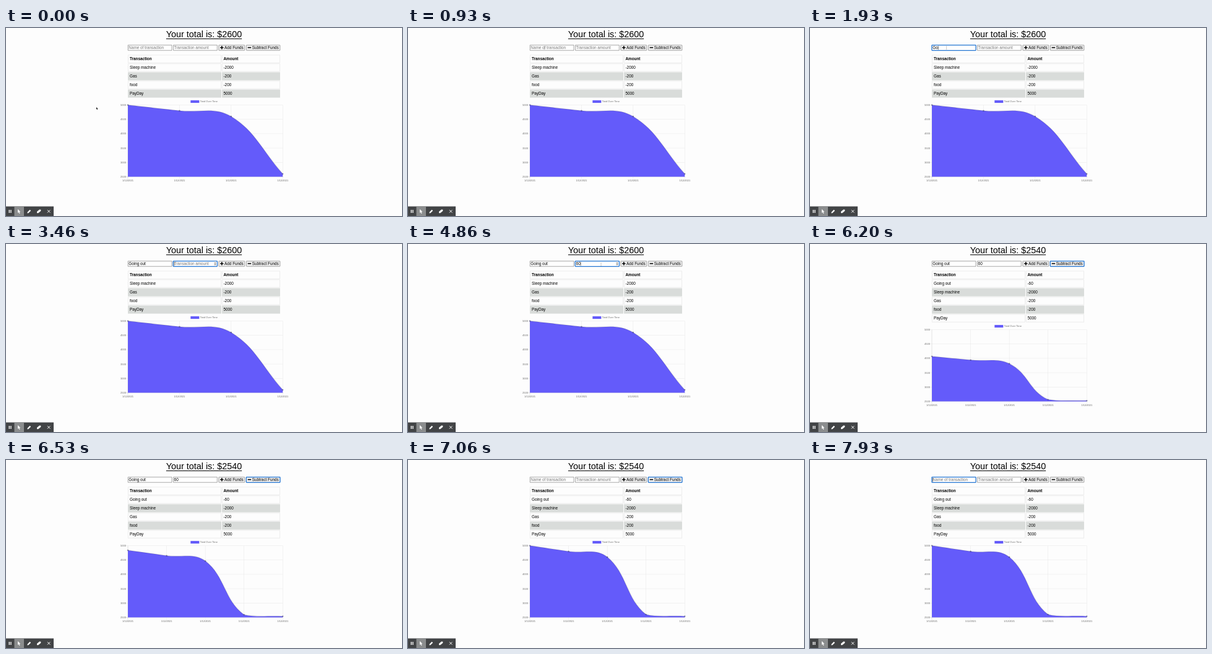
Animation of 640x304 px, one loop 8 s. Source, as an HTML page with a canvas:

```html
<!DOCTYPE html>
<html lang="en">
<head>
<meta charset="utf-8">
<title>Budget tracker</title>
<style>
  html, body { margin: 0; width: 100%; height: 100%; overflow: hidden; background: #fdfdfd; }
  canvas { display: block; width: 640px; height: 304px; }
</style>
</head>
<body>
<canvas id="stage"></canvas>
<script>
const LOOP = 8000;
const W = 640, H = 304;
const FONT = '"Liberation Sans", Arial, sans-serif';
const INK = '#000', PURPLE = '#645bfa', FOCUS = '#2476d2';

const canvas = document.getElementById('stage');
const ratio = window.devicePixelRatio || 1;
canvas.width = W * ratio;
canvas.height = H * ratio;
const ctx = canvas.getContext('2d');
ctx.scale(ratio, ratio);

// Times in ms
const T = {
  nameFocus: 1000, amountFocus: 3200, submit: 5730,
  update: 6060, clear: 6600, refocus: 7530
};
const NAME_KEYS = [1730, 1860, 2000, 2060, 2200, 2260, 2400, 2460, 2530];
const AMOUNT_KEYS = [3730, 3800];
const GROW_START = 5941, GROW_TIME = 1190;

const BEFORE = [['Sleep machine', -2000], ['Gas', -200], ['food', -200], ['PayDay', 5000]];
const AFTER = [['Going out', -60], ...BEFORE];

// Pointer legs: start, end, from, to, time at which it hides
const MOVES = [
  [60, 730, [146, 128], [220.5, 32], 2600],
  [3060, 3200, [238, 32], [305, 32], 3260],
  [4860, 5600, [312, 33], [408, 33], 5730],
  [7200, 7500, [408, 33], [228, 32], 7560]
];

const clamp = (v, lo, hi) => Math.min(hi, Math.max(lo, v));
const smooth = p => p * p * (3 - 2 * p);
const outQuart = p => 1 - (1 - p) ** 4;
const typed = (word, keys, t) => word.slice(0, keys.filter(k => k <= t).length);

function text(str, x, y, size, { color = INK, align = 'left', weight = 'normal' } = {}) {
  ctx.font = `${weight} ${size}px ${FONT}`;
  ctx.fillStyle = color;
  ctx.textAlign = align;
  ctx.fillText(str, x, y);
  return ctx.measureText(str).width;
}

function rect(x, y, w, h, color) {
  ctx.fillStyle = color;
  ctx.fillRect(x, y, w, h);
}

function frame(x, y, w, h, color, line, r = 0) {
  ctx.strokeStyle = color;
  ctx.lineWidth = line;
  ctx.beginPath();
  ctx.roundRect(x, y, w, h, r);
  ctx.stroke();
}

function shape(points, fill, stroke, line = 1) {
  ctx.beginPath();
  points.forEach(([x, y]) => ctx.lineTo(x, y));
  ctx.closePath();
  if (stroke) {
    ctx.strokeStyle = stroke;
    ctx.lineWidth = line;
    ctx.stroke();
  }
  ctx.fillStyle = fill;
  ctx.fill();
}

function drawTitle(total) {
  const w = text('Your total is: $' + total, 320, 15.4, 14.35, { align: 'center' });
  rect(320 - w / 2, 17, w, 1, INK);
}

function drawField(x, value, hint, focusedAt, t) {
  const focused = focusedAt !== null;
  rect(x, 27.5, 71, 8.8, '#fff');
  if (focused) frame(x - 0.1, 27.6, 71.2, 8.8, FOCUS, 1.3, 0.8);
  else frame(x + 0.2, 27.7, 70.8, 8.5, '#858585', 0.7);
  const w = text(value || hint, x + 1.3, 34.1, 6.35, { color: value ? INK : '#777' });
  if (focused && Math.floor((t - focusedAt) / 530) % 2 === 0) {
    rect(x + 1.4 + (value ? w : 0), 28.8, 0.6, 6.4, '#222');
  }
}

function drawSpinner(x) {
  rect(x - 2, 28.6, 4, 6.6, '#eee');
  shape([[x - 1.1, 31.3], [x, 29.7], [x + 1.1, 31.3]], '#444');
  shape([[x - 1.1, 32.7], [x, 34.3], [x + 1.1, 32.7]], '#444');
}

function drawButton(x, w, label, plus, focused) {
  rect(x, 27.6, w, 8.8, '#efefef');
  if (focused) frame(x + 0.1, 27.6, w - 0.2, 8.8, FOCUS, 1.3, 0.8);
  else frame(x + 0.2, 27.7, w - 0.4, 8.5, '#858585', 0.7, 0.5);
  rect(x + 2.5, 30.9, 5.4, 1.5, INK);
  if (plus) rect(x + 4.45, 28.95, 1.5, 5.4, INK);
  text(label, x + 9.5, 34.1, 6.35);
}

function drawRow(cells, index) {
  const mid = 50 + index * 14;
  const shaded = index > 0 && index % 2 === 0;
  [[197, 151], [349, 94]].forEach(([x, w], i) => {
    if (shaded) rect(x, mid - 6.5, w, 13.1, '#d9dcda');
    else frame(x + 0.4, mid - 6.2, w - 0.8, 12.5, '#e6e6e6', 0.7);
    text(cells[i], x + (i ? 2.5 : 3), mid + 2.2, 6.35, { weight: index ? 'normal' : 'bold' });
  });
}

// Control points for a spline with tension 0.4, kept inside the plot
function controls(pts, top, base) {
  return pts.map((p, i) => {
    const a = pts[i - 1] || p, b = pts[i + 1] || p;
    const d1 = Math.hypot(p[0] - a[0], p[1] - a[1]);
    const d2 = Math.hypot(b[0] - p[0], b[1] - p[1]);
    const ctrl = k => [p[0] + k * (b[0] - a[0]), clamp(p[1] + k * (b[1] - a[1]), top, base)];
    return { before: ctrl(-0.4 * d1 / (d1 + d2)), after: ctrl(0.4 * d2 / (d1 + d2)) };
  });
}

function drawChart(rows, top, grow) {
  const left = 197, right = 447.3, height = 116, base = top + height;
  let sum = 0;
  const totals = [...rows].reverse().map(r => sum += r[1]);
  const step = (right - left) / (totals.length - 1);

  rect(298.3, top - 7.6, 14, 4.2, PURPLE);
  text('Total Over Time', 313.8, top - 4.1, 4, { color: '#666' });

  for (let i = 0; i <= 5; i++) {
    const y = top + i * height / 5;
    rect(left - 3, y - 0.25, right - left + 3, 0.5, i === 5 ? '#ccc' : '#e7e7e7');
    text(String(5000 - i * 500), left - 3, y + 1.4, 4, { color: '#666', align: 'right' });
  }
  totals.forEach((_, i) => {
    const x = left + i * step;
    rect(x - 0.25, top, 0.5, height + 3.5, i ? '#e7e7e7' : '#ccc');
    text('1/12/2021', x, base + 7.4, 4, { color: '#666', align: 'center' });
  });

  const pts = totals.map((v, i) => [left + i * step, base - (v - 2500) / 2500 * height]);
  const ctrl = controls(pts, top, base);
  const rise = ([x, y]) => [x, base + (y - base) * grow];
  const curve = () => {
    ctx.lineTo(...rise(pts[0]));
    for (let i = 1; i < pts.length; i++) {
      ctx.bezierCurveTo(...rise(ctrl[i - 1].after), ...rise(ctrl[i].before), ...rise(pts[i]));
    }
  };

  ctx.beginPath();
  ctx.moveTo(left, base);
  curve();
  ctx.lineTo(right, base);
  ctx.closePath();
  ctx.fillStyle = PURPLE;
  ctx.fill();

  ctx.beginPath();
  curve();
  ctx.strokeStyle = 'rgba(0,0,0,.12)';
  ctx.lineWidth = 1.3;
  ctx.stroke();

  pts.map(rise).forEach(([x, y]) => {
    ctx.beginPath();
    ctx.arc(x, y, 1.2, 0, Math.PI * 2);
    ctx.fillStyle = 'rgba(50,50,100,.5)';
    ctx.fill();
  });
}

function drawToolbar() {
  rect(0, 288.5, 77, 15.5, '#424446');
  rect(13.5, 288.5, 15.5, 15.5, '#8b8d8e');
  rect(4.6, 294, 1.4, 5, '#fff');
  rect(7.2, 294, 1.4, 5, '#fff');
  shape([[19, 293], [19, 299], [20.4, 297.8], [21.5, 300.2], [22.6, 299.7],
    [21.5, 297.4], [23.4, 297.2]], '#fff');
  shape([[34.4, 299.6], [34.7, 297.7], [38.6, 293.8], [40.2, 295.4], [36.3, 299.3]], '#fff');
  shape([[50, 297], [54, 293.6], [56.4, 293.8], [56.2, 296], [52.2, 299.3], [50.1, 299.2]], '#fff');
  ctx.strokeStyle = '#fff';
  ctx.lineWidth = 1;
  ctx.beginPath();
  ctx.moveTo(67, 294.2);
  ctx.lineTo(71.4, 298.6);
  ctx.moveTo(71.4, 294.2);
  ctx.lineTo(67, 298.6);
  ctx.stroke();
}

function drawPointer(t) {
  const move = MOVES.find(([start, , , , hide], i) => (t >= start || i === 0) && t < hide);
  if (!move) return;
  const [start, end, from, to] = move;
  const p = smooth(clamp((t - start) / (end - start), 0, 1));
  const x = from[0] + (to[0] - from[0]) * p;
  const y = from[1] + (to[1] - from[1]) * p;
  const overField = y > 27 && y < 37 && x > 197 && x < 342;
  if (overField) {
    rect(x - 0.25, y - 2.5, 0.5, 5, '#999');
    rect(x - 0.9, y - 2.7, 1.8, 0.4, '#aaa');
    rect(x - 0.9, y + 2.3, 1.8, 0.4, '#aaa');
  } else {
    shape([[0, 0], [0, 3.6], [0.8, 2.9], [1.4, 4.2], [2, 3.9], [1.5, 2.7], [2.5, 2.6]]
      .map(([dx, dy]) => [x + dx, y + dy]), '#111', '#fff', 0.7);
  }
}

function draw(t) {
  const updated = t >= T.update;
  const rows = updated ? AFTER : BEFORE;
  const cleared = t >= T.clear;
  const onAmount = t >= T.amountFocus && t < T.submit;
  let nameFocus = null;
  if (t >= T.refocus) nameFocus = T.refocus;
  else if (t >= T.nameFocus && t < T.amountFocus) {
    const keys = NAME_KEYS.filter(k => k <= t);
    nameFocus = keys.length ? keys[keys.length - 1] : T.nameFocus;
  }
  const amountFocus = onAmount ? (t >= AMOUNT_KEYS[1] ? AMOUNT_KEYS[1] : T.amountFocus) : null;

  rect(0, 0, W, H, '#fdfdfd');
  drawTitle(updated ? 2540 : 2600);
  drawField(197, cleared ? '' : typed('Going out', NAME_KEYS, t), 'Name of transaction', nameFocus, t);
  drawField(270.3, cleared ? '' : typed('60', AMOUNT_KEYS, t), 'Transaction amount', amountFocus, t);
  if (onAmount) drawSpinner(338);
  drawButton(343.6, 42.4, 'Add Funds', true, false);
  drawButton(388.2, 54.9, 'Subtract Funds', false, t >= T.submit && t < T.refocus);

  [['Transaction', 'Amount'], ...rows].forEach(drawRow);
  const grow = updated ? outQuart(clamp((t - GROW_START) / GROW_TIME, 0, 1)) : 1;
  drawChart(rows, updated ? 138.5 : 124.5, grow);
  drawToolbar();
  drawPointer(t);
}

const begin = performance.now();
function tick() {
  draw((performance.now() - begin) % LOOP);
  requestAnimationFrame(tick);
}
tick();
</script>
</body>
</html>
```
